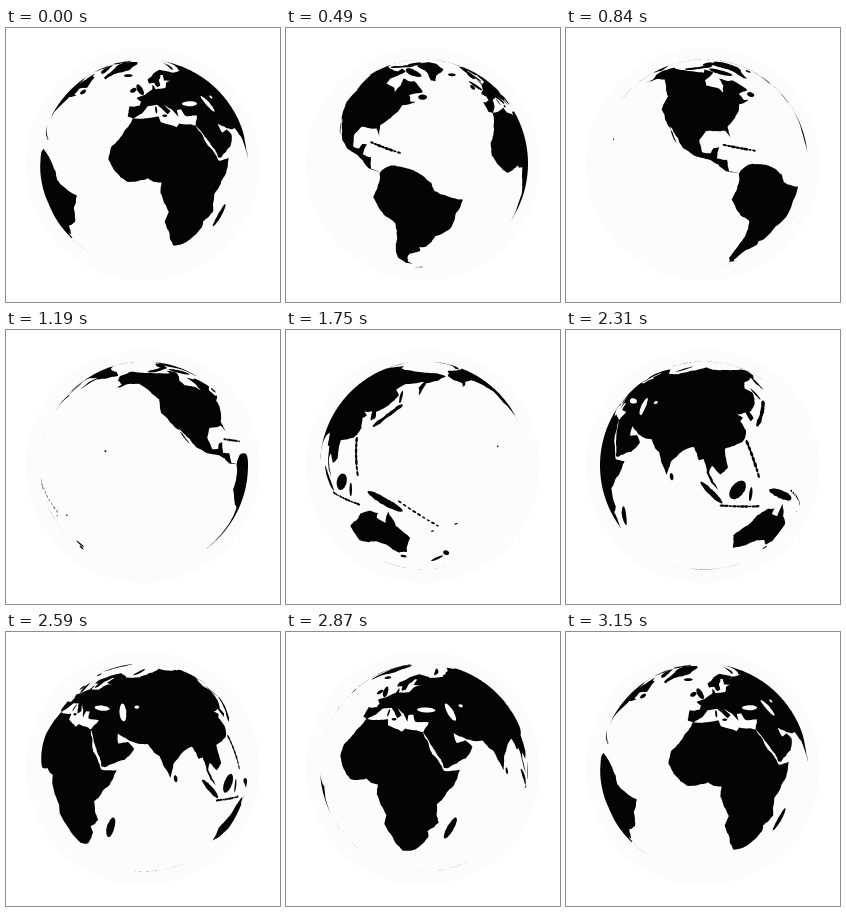
These frames come from a looping animation (274x274 px, 3220 ms). An HTML page with a canvas:

```html
<!DOCTYPE html>
<html lang="en">
<head>
<meta charset="utf-8">
<title>Turning globe</title>
<style>
html, body { margin: 0; width: 100%; height: 100%; overflow: hidden; background: #fff; }
canvas { display: block; }
</style>
</head>
<body>
<canvas id="stage" width="274" height="274"></canvas>
<script>
const ctx = document.getElementById('stage').getContext('2d');
const WATER = '#fcfcfc', LAND = '#040404';
const CX = 138, CY = 135.5, RADIUS = 104;
const RAD = Math.PI / 180, EYE = 8, TILT = 13.5 * RAD, START_LON = 1 * RAD;
const STEP_MS = 70, LOOP_MS = 3220, STEPS = 45;

// Key capes and bays as longitude, latitude pairs; the coast between them is fractal
const continents = {
  africa: [-6,36, 10,37.2, 11,34, 20,31, 22,32.8, 32.5,31, 37.2,20, 43,11.7, 51.2,11.8, 48,4.5, 39.3,-5,
    40.6,-15, 34.8,-20, 35.3,-24, 32.5,-28.3, 26,-34, 20,-34.8, 18.2,-32, 14.5,-23, 11.8,-17, 13.6,-11.5,
    9,-1, 9.6,4, 6,4.4, 3,6.3, -7.6,4.5, -13,8.8, -17.3,14.7, -16.5,21, -10,29.7],
  europe: [-9,37, -9,43, -2,43.4, -1.2,46, -4.5,48.3, 1.5,50.2, 8,53.7, 9,57.5, 11,54, 20,54.7, 22,57.4,
    24,59, 30,60, 22,60.5, 25,65.3, 22,65.5, 17.3,61.5, 16,56.5, 13,55.5, 11,59, 6,58.3, 5,62, 14,67.5,
    26,71, 41,67, 34,65, 44,67, 67,68.5, 67,36, 36,36.3, 27.5,36.7, 26,40.6, 23,40.3, 23,36.5, 19.4,41,
    13,45.5, 18.4,40, 16,38.2, 10,44, 3.2,43, -0.3,39, -5.5,36],
  asia: [60,68.5, 73,72, 81,73, 104,77.5, 113,74, 140,72.5, 180,69.5, 190,66, 178,62.5, 163,60, 157,51,
    156,57, 161,61.5, 143,59.3, 136,54.7, 140.5,51, 135.5,44, 128,39.5, 129.3,36, 126.5,34.5, 125,39.6,
    118.5,39, 122,37, 119.5,35, 121.8,30, 118.5,24.5, 108,21.5, 109,12, 105,9, 101,13.3, 99.5,10, 104,1.4,
    100.5,5, 98.3,10, 97,16.5, 94.4,16, 91.5,22.5, 87,21, 80.2,15, 78,8.2, 73,19, 70,21, 67,25, 57,26.5,
    50,30, 51,25, 56.2,26, 59.8,22.5, 55,17, 45,12.8, 43,13, 39,21.3, 34.8,28, 32.5,31, 36,36.5, 60,45],
  northAmerica: [-167,66, -157,71.2, -128,70.3, -95,68.5, -95,72, -82,68.5, -94,61, -93,57, -82,54.5,
    -79.5,51.5, -77,56.5, -78,62.4, -70,60, -64.5,60.3, -56,52, -66.5,50, -65,46, -61,45.8, -66,44,
    -70,43.5, -75.7,36, -81.3,31.5, -80.3,25.5, -83,29.5, -94,29.5, -97.5,25, -96,19, -91.5,18.5, -90,21,
    -87,21.3, -88.5,15.8, -83.3,15, -82.5,9.3, -77.5,8, -84,9.5, -88,13, -95,16, -105.5,20.5, -109.3,25.7,
    -114.7,31.5, -109.7,23, -117.2,32.7, -124,40.3, -123.5,48.5, -131,55, -140,59.8, -151,59.5, -163,55,
    -157.5,58.8, -165,62],
  southAmerica: [-77.5,8, -72,12, -62,10.7, -51.5,4.2, -50,0, -44,-2.7, -35.3,-5.5, -38.7,-13, -41,-22,
    -48.5,-26, -53.5,-34, -58,-34.5, -57.5,-38, -65,-41, -67.5,-46, -68.5,-52, -65.5,-54.8, -72,-54,
    -75.5,-47, -73.5,-37, -70.3,-18.3, -76,-14, -81.2,-5, -77.5,4],
  australia: [142.5,-10.7, 146,-18.8, 153.2,-26, 150,-37.3, 144,-38.7, 137.8,-33, 131,-31.5, 124,-33.8,
    115.2,-34.5, 113.5,-25, 121,-19.5, 126,-14, 132,-11.5, 136.8,-12.2, 135.7,-15, 140.5,-17.5],
  greenland: [-72,78, -54,71, -48,61, -43,60, -40,65, -22,71, -18,80, -30,83.5, -60,82]
};

let seed = 7;
const random = () => (seed = seed * 16807 % 2147483647) / 2147483647;

// Ellipse on the sphere: centre, half length, half width, slope in degrees
function blob(lon, lat, long, wide, slope = 0) {
  const c = Math.cos(slope * RAD), s = Math.sin(slope * RAD), ring = [];
  for (let a = 0; a < 360; a += 24) {
    const u = long * Math.cos(a * RAD), v = wide * Math.sin(a * RAD);
    ring.push([lon + (u * c - v * s) / Math.cos(lat * RAD), lat + u * s + v * c]);
  }
  return ring;
}

// Row of random islets between two places
function chain(lon1, lat1, lon2, lat2, count, size) {
  const slope = Math.atan2(lat2 - lat1, lon2 - lon1) / RAD;
  return Array.from({ length: count }, (_, i) => {
    const k = i / (count - 1), long = size * (0.8 + 0.5 * random());
    return blob(lon1 + (lon2 - lon1) * k, lat1 + (lat2 - lat1) * k, long, long * 0.5, slope);
  });
}

function antarctica() {
  const ring = [];
  for (let lon = -180; lon < 180; lon += 5) ring.push([lon, -70.5 + 4.7 * Math.cos((lon - 105) * RAD)]);
  return ring;
}

function pairs(flat) {
  const points = [];
  for (let i = 0; i < flat.length; i += 2) points.push([flat[i], flat[i + 1]]);
  return points;
}

// Midpoint displacement: bends edges with the sphere and roughens the coast
function splitEdge(a, b, out) {
  const dx = b[0] - a[0], dy = b[1] - a[1];
  if (Math.hypot(dx, dy) < 1.5) return out.push(a);
  const shrink = Math.cos((a[1] + b[1]) / 2 * RAD), shift = (random() - 0.5) * 0.14;
  const mid = [(a[0] + b[0]) / 2 - dy * shift / shrink, (a[1] + b[1]) / 2 + dx * shrink * shift];
  splitEdge(a, mid, out);
  splitEdge(mid, b, out);
}

function coast(ring) {
  const out = [];
  ring.forEach((p, i) => {
    const next = ring[(i + 1) % ring.length];
    const wrap = next[0] - p[0] < -180 ? 360 : 0;
    splitEdge(p, [next[0] + wrap, next[1]], out);
  });
  return out.map(([lon, lat]) => [lon * RAD, lat * RAD]);
}

const land = [
  ...Object.values(continents).map(pairs),
  antarctica(),
  blob(-62, -66, 4, 1.2, 55),         // Antarctic Peninsula
  blob(-2.5, 54, 4.2, 1.4, 113),      // Britain
  blob(-8, 53.3, 1.9, 1.4, 60),       // Ireland
  blob(-18.5, 65, 2.4, 1.4),          // Iceland
  blob(9, 41, 2.1, 0.5, 90),          // Sardinia, Corsica
  blob(14, 37.5, 1.3, 0.7),           // Sicily
  blob(58, 74, 5, 0.9, 60),           // Novaya Zemlya
  blob(-72, 68.5, 6.5, 2.3, 140),     // Baffin
  blob(-80, 79.5, 4, 2.5, 45),        // Ellesmere
  blob(-56, 48.8, 2.2, 1.7),          // Newfoundland
  blob(47, -19, 6.8, 1.9, 70),        // Madagascar
  blob(80.8, 7.5, 1.8, 0.9, 100),     // Ceylon
  blob(100.7, 0, 7.8, 1.4, -46),      // Sumatra
  blob(113.8, 0.8, 5.3, 3.5, 50),     // Borneo
  blob(120.8, -2, 3.6, 0.9, 85),      // Sulawesi
  blob(141, -5.5, 10.3, 2.1, -25),    // New Guinea
  blob(175.8, -38.7, 2.7, 1.4, 120),  // New Zealand, north
  blob(170.3, -44, 4, 1.2, 48),       // New Zealand, south
  blob(146.6, -42, 1.6, 1.4),         // Tasmania
  blob(142.8, 50, 4.2, 0.7, 95),      // Sakhalin
  blob(-155.5, 19.7, 0.5, 0.5),       // Hawaii
  ...chain(130.8, 32.5, 143.5, 43.5, 8, 1.9),   // Japan
  ...chain(121, 23.5, 125.3, 7, 7, 1.4),        // Taiwan, Philippines
  ...chain(106, -6.8, 125, -9, 10, 1.1),        // Java, Timor
  ...chain(149, -5, 168, -18, 9, 0.9),          // Melanesia
  ...chain(165.5, -21.3, 178, -17.7, 2, 0.9),   // New Caledonia, Fiji
  ...chain(-84, 22.3, -68, 18.5, 8, 1.1),       // Antilles
  ...chain(-120, 72, -85, 76, 6, 2.4)           // Arctic islands
].map(coast);

const seas = [
  blob(34.5, 43.3, 4.6, 1.5, -3),     // Black Sea
  blob(50.8, 41.8, 5.4, 1.7, 105),    // Caspian
  blob(60, 45, 1.2, 1)                // Aral
].map(coast);

// Perspective view; hidden points slide out to the rim
function project([lon, lat], turn) {
  const east = Math.cos(lat) * Math.sin(lon - turn);
  const front = Math.cos(lat) * Math.cos(lon - turn);
  const up = Math.sin(lat) * Math.cos(TILT) - front * Math.sin(TILT);
  const depth = Math.sin(lat) * Math.sin(TILT) + front * Math.cos(TILT);
  const visible = depth > 1 / EYE;
  const k = RADIUS * (visible ? Math.sqrt(EYE * EYE - 1) / (EYE - depth) : 1 / Math.hypot(east, up));
  return { x: CX + east * k, y: CY - up * k, visible };
}

function fillShape(shape, turn, color) {
  const points = shape.map(p => project(p, turn));
  if (!points.some(p => p.visible)) return;
  ctx.fillStyle = color;
  ctx.beginPath();
  points.forEach(p => ctx.lineTo(p.x, p.y));
  ctx.fill();
}

function draw(time) {
  const step = Math.floor(time % LOOP_MS / STEP_MS) % STEPS;
  const turn = START_LON - step / STEPS * 2 * Math.PI;
  ctx.fillStyle = '#fff';
  ctx.fillRect(0, 0, 274, 274);
  ctx.fillStyle = WATER;
  ctx.beginPath();
  ctx.arc(137, 136, 117, 0, 2 * Math.PI);
  ctx.fill();
  land.forEach(s => fillShape(s, turn, LAND));
  seas.forEach(s => fillShape(s, turn, WATER));
}

const start = performance.now();
function tick() {
  draw(performance.now() - start);
  requestAnimationFrame(tick);
}
tick();
</script>
</body>
</html>
```
